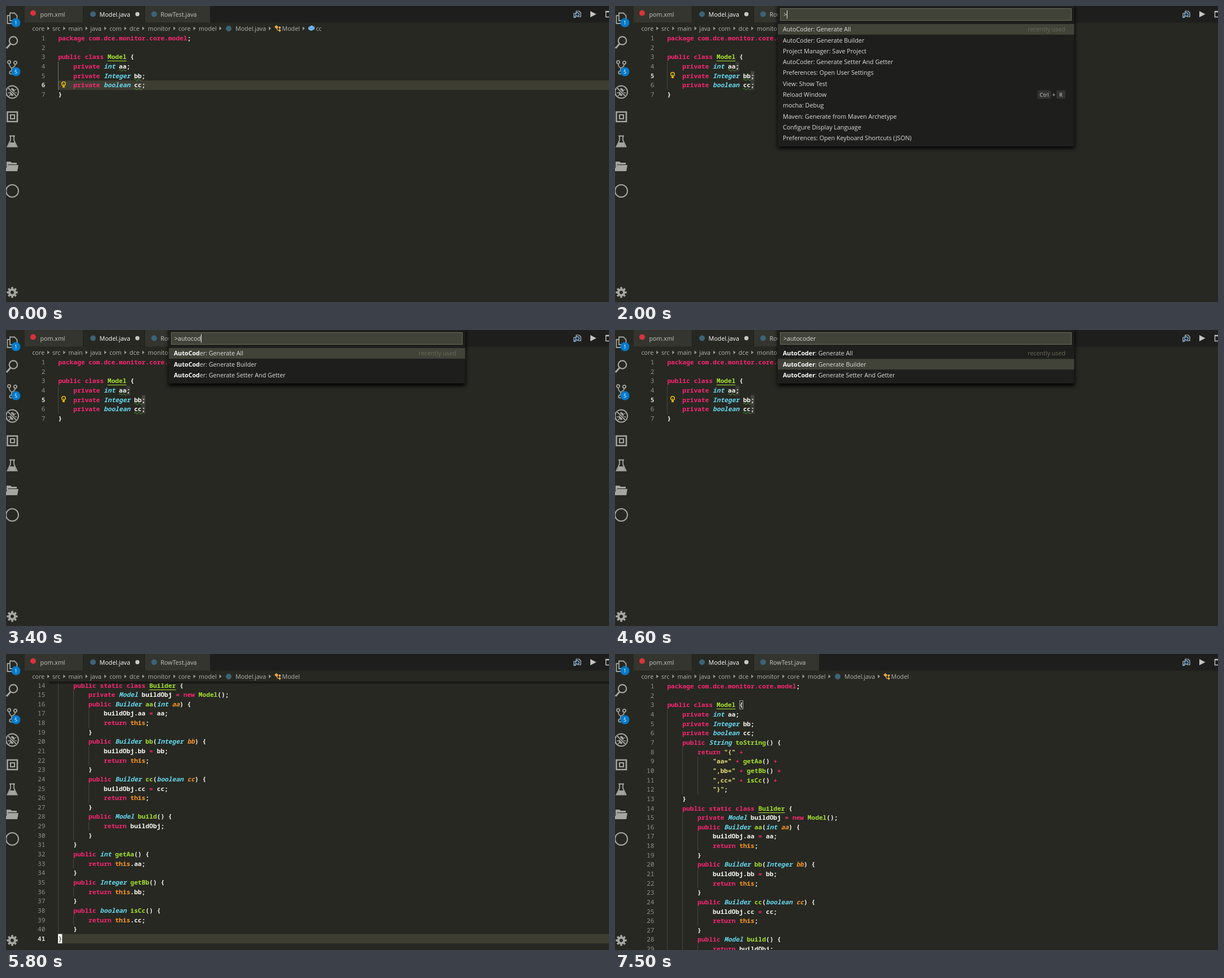
An HTML page with a canvas that plays this animation: 1067x525 px, repeating every 8000 ms.

```html
<!DOCTYPE html>
<html lang="en">
<head>
<meta charset="utf-8">
<title>Generating Java code from the command palette</title>
<style>
html, body { margin: 0; width: 100%; height: 100%; overflow: hidden; background: #272822; }
canvas { display: block; }
</style>
</head>
<body>
<canvas id="stage" width="1067" height="525"></canvas>
<script>
const ctx = document.getElementById('stage').getContext('2d');
const LOOP = 8000, LINE = 16.64, TOP = 49, LEFT = 92.4, MAX_SCROLL = 218;
const UI = '10.7px "Open Sans", "Noto Sans", sans-serif';
const MONO = '11.2px "Noto Sans Mono", "DejaVu Sans Mono", monospace';
const RED = '#f92672', BLUE = '#66d9ef', GREEN = '#a6e22e', ORANGE = '#fd971f',
  YELLOW = '#e6db74', WHITE = '#f8f8f2', ICON = '#a6a6a1', BACK = '#272822', DARK = '#1e1f1c';

const header = ['package com.dce.monitor.core.model;', '', 'public class Model {',
  '    private int aa;', '    private Integer bb;', '    private boolean cc;'];
const fields = [['int', 'aa', 'getAa'], ['Integer', 'bb', 'getBb'], ['boolean', 'cc', 'isCc']];
const before = [...header, '}'];
const after = [...header,
  '    public String toString() {', '        return "{" +',
  ...fields.map(([, name, getter], i) => `            "${i ? ',' : ''}${name}=" + ${getter}() +`),
  '            "}";', '    }',
  '    public static class Builder {', '        private Model buildObj = new Model();',
  ...fields.flatMap(([type, name]) => [`        public Builder ${name}(${type} ${name}) {`,
    `            buildObj.${name} = ${name};`, '            return this;', '        }']),
  '        public Model build() {', '            return buildObj;', '        }', '    }',
  ...fields.flatMap(([type, name, getter]) => [`    public ${type} ${getter}() {`,
    `        return this.${name};`, '    }']),
  '}'];

const coder = ['AutoCoder: Generate All', 'AutoCoder: Generate Builder', 'AutoCoder: Generate Setter And Getter'];
const recent = [coder[0], coder[1], 'Project Manager: Save Project', coder[2],
  'Preferences: Open User Settings', 'View: Show Test', 'Reload Window', 'mocha: Debug',
  'Maven: Generate from Maven Archetype', 'Configure Display Language',
  'Preferences: Open Keyboard Shortcuts (JSON)'];
const matches = [...coder, 'autoPlay: Click for pause', 'autoPlay: Click for play',
  'Debug: Toggle Auto Attach', 'Extensions: Disable Auto Updating Extensions',
  'Extensions: Enable Auto Updating Extensions', 'File: Toggle Auto Save',
  'Tasks: Allow Automatic Tasks in Folder', 'Tasks: Disallow Automatic Tasks in Folder'];

// Last value whose start time has passed
const at = (t, steps) => steps.reduce((value, [start, next]) => t >= start ? next : value, undefined);

function rect(x, y, w, h, color) {
  ctx.fillStyle = color;
  ctx.fillRect(x, y, w, h);
}
function disc(x, y, r, color) {
  ctx.fillStyle = color;
  ctx.beginPath();
  ctx.arc(x, y, r, 0, 7);
  ctx.fill();
}
function stroke(path, color = ICON, width = 1.8) {
  ctx.strokeStyle = color;
  ctx.lineWidth = width;
  ctx.stroke(new Path2D(path));
}
function fill(path, color = ICON) {
  ctx.fillStyle = color;
  ctx.fill(new Path2D(path));
}
const ring = (x, y, r) => `M${x - r} ${y}a${r} ${r} 0 1 0 ${2 * r} 0a${r} ${r} 0 1 0 ${-2 * r} 0`;
function text(str, x, y, color, font = UI, align = 'left') {
  ctx.font = font;
  ctx.fillStyle = color;
  ctx.textAlign = align;
  ctx.fillText(str, x, y);
  return ctx.measureText(str).width;
}

function badge(y, label) {
  disc(17.5, y, 8, '#007acc');
  text(label, 17.5, y + 3.4, '#fff', UI.replace('10.7', '9'), 'center');
}

function drawActivityBar() {
  stroke('M7 12.5H15L19.5 17V26H7ZM6 17H2.5V31H13');
  badge(29.5, '1');
  stroke(ring(13, 61.5, 7.2), ICON, 2.2);
  stroke('M8 67L1 75', ICON, 3);
  stroke(ring(5.5, 99.5, 2.7) + ring(16.5, 100.5, 2.7) + ring(9, 118, 2.7) +
    'M5.5 102Q6 108 10 110V115M16.5 103Q16 108 10 110');
  badge(116.5, '5');
  stroke(ring(11, 152.5, 11), ICON, 2);
  fill('M7 149Q11 142 15 149V156Q11 163 7 156Z');
  stroke('M4 148L8 150M3 154H19M5 160L8 157M18 148L14 150M17 160L14 157', ICON, 1.3);
  stroke('M3.5 145L18.5 160', BACK, 4);
  stroke('M3.5 145L18.5 160');
  stroke('M2.5 188H20V205H2.5Z', ICON, 2.6);
  stroke('M8 193H15V200H8Z', ICON, 2.2);
  stroke('M8 231V238L2.5 249.5H19.5L14 238V231M6 230.5H16');
  fill('M7 242H15L18 249H4Z');
  fill('M1 276H8L10 278H19V281H4L1 288Z');
  fill('M4 282H22L20 293H0V288Z');
  stroke(ring(11, 328, 11), ICON, 2);
  stroke(ring(11, 508, 5), ICON, 4);
  for (let i = 0; i < 8; i++) {
    const a = i * Math.PI / 4, c = Math.cos(a), s = Math.sin(a);
    stroke(`M${11 + 6 * c} ${508 + 6 * s}L${11 + 9.6 * c} ${508 + 9.6 * s}`, ICON, 3.6);
  }
}

function drawTabs() {
  rect(33, 0, 1034, 29.5, DARK);
  rect(33, 0, 103, 29.5, '#34352f');
  rect(137, 0, 108, 29.5, BACK);
  rect(246, 0, 115, 29.5, '#34352f');
  disc(48, 12.5, 5, '#d6343a');
  disc(154, 14.5, 5, '#3b6478');
  disc(262, 14.5, 5, '#3b6478');
  text('pom.xml', 60.5, 18.5, '#c8c8c3');
  text('Model.java', 165.5, 18.5, '#fff');
  text('RowTest.java', 273.5, 18.5, '#c8c8c3');
  disc(232.5, 14.5, 3.7, '#c8c8c3');
  stroke('M1009 12V9H1014L1017 12V19H1012M1005 13H1009M1005 13V20H1009', '#c5c5c5', 1.2);
  stroke(ring(1011, 15, 3) + 'M1009 17L1005 21', '#75beff', 1.3);
  fill('M1034 9L1044.5 14.5L1034 20Z', '#c5c5c5');
  stroke('M1068 9.5H1061.5V19.5H1068M1061 10.5H1068', '#c5c5c5', 1.4);
}

function drawBreadcrumbs(field) {
  const crumbs = [['core', 46.5], ['src', 82], ['main', 110.5], ['java', 149], ['com', 183],
    ['dce', 218.5], ['monitor', 251], ['core', 305], ['model', 341], ['Model.java', 406], ['Model', 488.5]];
  if (field) crumbs.push([field, 548.5]);
  crumbs.forEach(([name, x], i) => {
    const end = x + text(name, x, 43.7, '#b2b2ac');
    if (i < crumbs.length - 1) fill(`M${end + 5} 36.5L${end + 9} 39.7L${end + 5} 43Z`, '#9a9a94');
  });
  disc(394, 40, 5, '#3b6478');
  fill('M475 37L478 34L482 37L479 41Z M482 38L484 36L487 38L484 41Z M482 43L484 41L487 43L484 46Z', '#e8ab53');
  stroke('M480 39V43H483', '#e8ab53', 1);
  if (field) {
    fill('M535 37.5L541 34.5L546 37V41L540 44L535 41.5Z', '#75beff');
    stroke('M536 38L540 40L545 37.5', '#2f5f85', 0.8);
  }
}

const KEYWORDS = /^(public|private|static|class|return|new)$/;
const TYPES = /^(int|Integer|boolean|String|Model|Builder)$/;

function tokenStyle(word, prior, rest) {
  if (word[0] === '"') return [YELLOW];
  if (word.startsWith('package') || KEYWORDS.test(word) || /^[=+]$/.test(word)) return [RED];
  if (word === 'this') return [ORANGE];
  if (/class $/.test(prior)) return [GREEN, '', true];
  if (/^\w/.test(word) && rest[0] === '(') return [GREEN];
  if (TYPES.test(word)) return [BLUE, 'italic '];
  if (/^\w/.test(word) && rest.startsWith(') {')) return [ORANGE, 'italic '];
  return [WHITE];
}

function drawCode(t) {
  const generated = t >= 5200;
  const lines = generated ? after : before;
  const scroll = at(t, [[0, 0], [5200, MAX_SCROLL], [7100, MAX_SCROLL - 66],
    [7200, MAX_SCROLL - 132], [7400, MAX_SCROLL - 198], [7500, 0]]);
  const current = at(t, [[0, 6], [1100, 5], [5200, 41]]);
  const selected = t >= 1200 && !generated;
  const lineTop = n => TOP + (n - 1) * LINE - scroll;
  ctx.font = MONO;
  const charWidth = ctx.measureText('0').width;
  const colX = col => LEFT + col * charWidth;

  ctx.save();
  ctx.beginPath();
  ctx.rect(33, 49, 1034, 476);
  ctx.clip();
  if (!selected) rect(92, lineTop(current), 975, LINE, '#3e3d32');

  lines.forEach((line, i) => {
    const y = lineTop(i + 1), base = y + 12.2;
    if (y < 20 || y > 530) return;
    const isCurrent = i + 1 === current;
    text(i + 1, 69.5, base, isCurrent ? '#d8d8d2' : '#90908a', (isCurrent ? '600 ' : '') + MONO, 'right');
    const indent = line.search(/\S/);
    for (let col = 0; col < indent; col += 4)
      rect(Math.floor(colX(col)), y, 1, LINE + 0.3, generated || selected ? '#464741' : '#74756e');
    if (selected && line.endsWith(';') && (isCurrent || t >= 1300))
      rect(colX(line.length - 1), y, charWidth, LINE, isCurrent ? '#45463f' : '#3a3b35');

    for (const m of line.matchAll(/package [\w.]+|"[^"]*"|\w+|\S/g)) {
      const [word] = m, x = colX(m.index);
      const [color, slant = '', underline] = tokenStyle(word, line.slice(0, m.index), line.slice(m.index + word.length));
      text(word, x, base, color, slant + '600 ' + MONO);
      if (underline) rect(x, Math.round(base + 3), word.length * charWidth, 1, color);
    }
    if (!generated && i >= 3 && i <= 5) {
      const x = colX(line.length - 3);
      stroke(`M${x} ${base + 3}` + 'q1.7 -3 3.4 0t3.4 0'.repeat(2), '#4fa83d', 1);
    }
  });

  if (t >= 5300) {
    const y = lineTop(41);
    rect(92, y, 7.3, LINE, WHITE);
    text('}', LEFT, y + 12.2, '#111', MONO);
    ctx.strokeStyle = '#a0a09a';
    ctx.lineWidth = 1;
    ctx.strokeRect(220.5, lineTop(3) + 0.5, 6, LINE - 2);
  }
  if (!generated && (t < 1100 || t >= 1400)) {
    const y = lineTop(current) + 5.5;
    stroke(ring(102, y, 3.3), '#f2c200', 1.5);
    stroke(`M102 ${y}V${y + 4}`, '#f2c200', 1);
    rect(100, y + 4, 4, 3, '#d8ae00');
  }
  if (scroll) {
    const shade = ctx.createLinearGradient(0, 49, 0, 54);
    shade.addColorStop(0, '#0009');
    shade.addColorStop(1, '#0000');
    rect(76, 49, 991, 5, shade);
  }
  ctx.restore();
}

// Splits a label into plain and matched parts
function labelParts(label, query) {
  if (!query) return [label];
  if (query === 'autoc' && label.startsWith('autoPlay'))
    return ['', 'auto', 'Play: ', 'C', label.slice(11)];
  const start = label.toLowerCase().indexOf(query), end = start + query.length;
  return [label.slice(0, start), label.slice(start, end), label.slice(end)];
}

function drawKey(label, x, w) {
  ctx.beginPath();
  ctx.roundRect(x, 149.5, w, 15, 2.5);
  ctx.fillStyle = '#32332f';
  ctx.fill();
  text(label, x + w / 2, 160.7, '#ccc', UI.replace('10.7', '9.6'), 'center');
}

function drawPalette(t) {
  const query = at(t, [[0, ''], [2400, 'a'], [2500, 'au'], [2600, 'aut'], [2700, 'auto'],
    [3100, 'autoc'], [3300, 'autoco'], [3400, 'autocod'], [3700, 'autocoder']]);
  const items = !query ? recent : matches.slice(0, at(query.length, [[1, 11], [5, 5], [6, 3]]));
  const active = t >= 4600 && t < 4700 ? 1 : 0;
  const row = 19.28, listTop = 32;
  const height = listTop + items.length * row + 5;

  ctx.save();
  ctx.shadowColor = '#000';
  ctx.shadowBlur = 7;
  ctx.shadowOffsetY = 4;
  rect(288, -5, 524.5, height + 5, DARK);
  ctx.restore();

  rect(292, 4, 516, 22, '#414339');
  ctx.strokeStyle = '#6a695a';
  ctx.lineWidth = 1;
  ctx.strokeRect(292.5, 4.5, 515, 21);
  const caret = 298 + text('>' + query, 298, 19, '#dededa');
  if (t < 4200 || t >= 4700) rect(Math.round(caret), 7.5, 1, 15, '#e8e8e2');

  rect(288, listTop + active * row, 524.5, row - 0.5, '#414339');
  items.forEach((label, i) => {
    const base = listTop + i * row + 13.3;
    let x = 297;
    labelParts(label, query).forEach((part, k) => {
      x += text(part, x, base, k % 2 ? '#fff' : '#dededa', (k % 2 ? 'bold ' : '') + UI);
    });
  });
  text('recently used', 797, 45.3, '#6c695a', UI, 'right');
  if (!query) {
    drawKey('Ctrl', 747.5, 24);
    text('+', 776.3, 160.8, '#ccc', UI, 'center');
    drawKey('R', 781, 16);
  } else if (items.length > 3) {
    rect(288, 90, 524.5, 1, '#66675f');
    text('other commands', 797, 103.2, '#6c695a', UI, 'right');
  }
}

function render(now) {
  const t = now % LOOP;
  rect(0, 0, 1067, 525, BACK);
  drawActivityBar();
  drawTabs();
  drawBreadcrumbs(at(t, [[0, 'cc'], [1400, 'bb'], [5800, '']]));
  drawCode(t);
  if (t >= 2000 && t < 5100) drawPalette(t);
}

const start = performance.now();
function frame() {
  render(performance.now() - start);
  requestAnimationFrame(frame);
}
frame();
</script>
</body>
</html>
```
